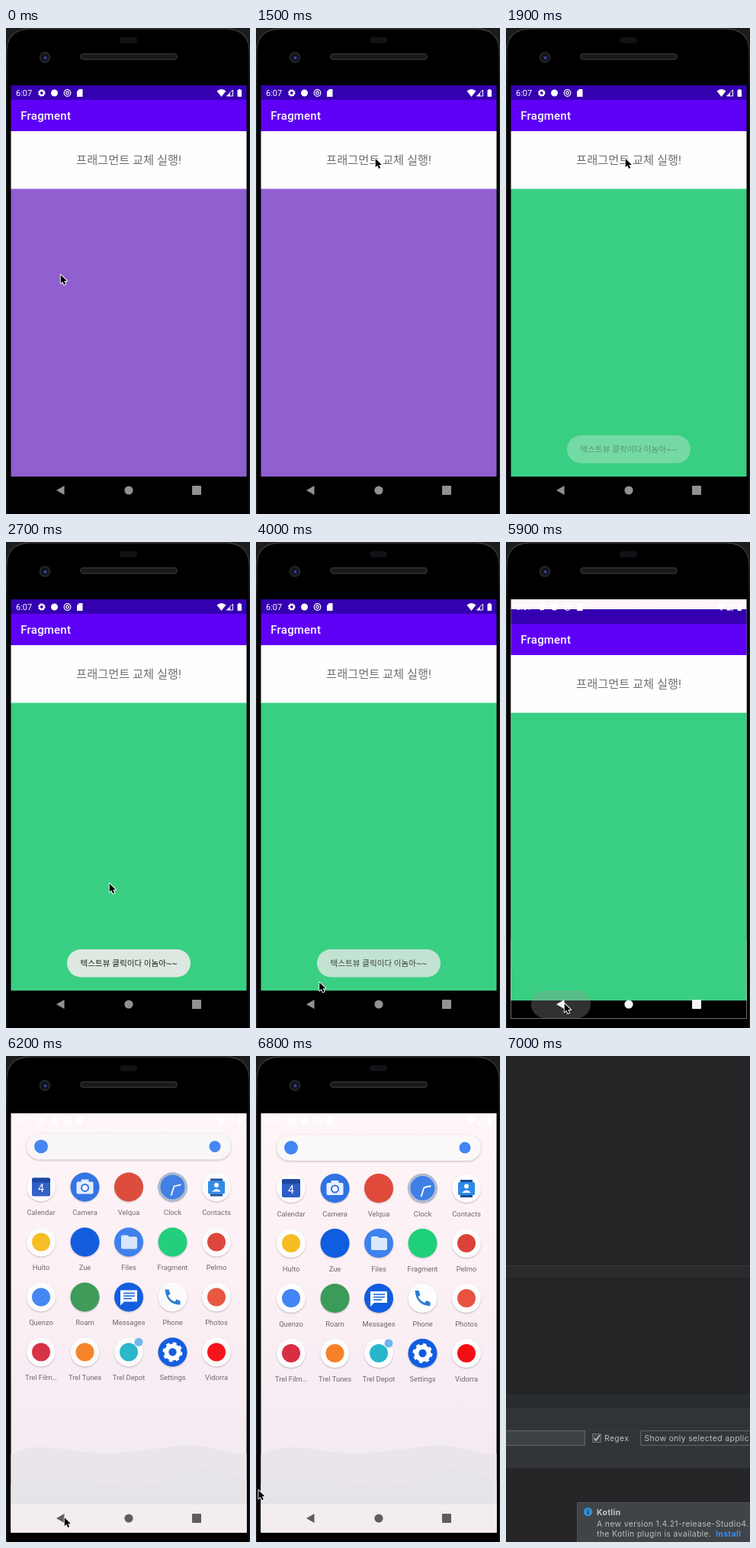
These frames come from a looping animation (320 px wide and 636 px high, 7.8 s). An HTML page with a canvas:

```html
<!DOCTYPE html>
<html lang="ko">
<head>
<meta charset="utf-8">
<style>
html, body { margin: 0; width: 100%; height: 100%; overflow: hidden; background: #000; }
canvas { display: block; width: 320px; height: 636px; }
</style>
</head>
<body>
<canvas id="stage" width="320" height="636"></canvas>
<script>
const g = document.getElementById('stage').getContext('2d');
const LOOP = 7800, STEP = 100;
const SWAP = 1800, PRESS = 5800, CLOSE = 5888, EDITOR = 7000;
const UI = 'Roboto, "Noto Sans CJK KR", "Noto Sans CJK JP", sans-serif';
const IDE = 'Inter, sans-serif';

// Pointer tip: time, x, y
const POINTER = [
  [0, 71, 322], [100, 116, 283], [200, 116, 283], [400, 188, 195], [500, 188, 195],
  [1300, 154, 174], [1500, 156, 170], [1900, 156, 170], [2700, 135, 446], [3300, 100, 562],
  [4100, 80, 577], [4900, 78, 581], [5200, 59, 600], [5400, 83, 606], [5600, 76, 603],
  [6300, 76, 603], [6900, -12, 560], [LOOP, -12, 560]
];

const clamp = v => Math.max(0, Math.min(1, v));
const ramp = (t, from, to) => clamp((t - from) / (to - from));
const decelerate = p => 1 - (1 - p) ** 3.4;

function rect(color, x, y, w, h, r = 0) {
  g.fillStyle = color;
  g.beginPath();
  g.roundRect(x, y, w, h, r);
  g.fill();
}
function disc(color, x, y, r) {
  g.fillStyle = color;
  g.beginPath();
  g.arc(x, y, r, 0, 7);
  g.fill();
}
function ring(color, x, y, r, width, dash = []) {
  g.strokeStyle = color;
  g.lineWidth = width;
  g.setLineDash(dash);
  g.beginPath();
  g.arc(x, y, r, 0, Math.PI * 2);
  g.stroke();
  g.setLineDash([]);
}
function path(d, fill, stroke, width = 1) {
  const p = new Path2D(d);
  if (stroke) { g.strokeStyle = stroke; g.lineWidth = width; g.stroke(p); }
  if (fill) { g.fillStyle = fill; g.fill(p); }
}
function text(s, x, y, font, color, align = 'left', spacing = 0) {
  g.font = font;
  g.fillStyle = color;
  g.textAlign = align;
  g.letterSpacing = spacing + 'px';
  g.fillText(s, x, y);
}
function gradient(x0, y0, x1, y1, ...colors) {
  const f = g.createLinearGradient(x0, y0, x1, y1);
  colors.forEach((c, i) => f.addColorStop(i / (colors.length - 1), c));
  return f;
}
function gear(color, x, y, r) {
  ring(color, x, y, r * .62, r * .45);
  const tooth = r * .85 * Math.PI / 8;
  ring(color, x, y, r * .85, r * .3, [tooth, tooth]);
}
function group(alpha, x, y, draw) {
  g.save();
  g.globalAlpha *= alpha;
  g.translate(x, y);
  draw();
  g.restore();
}

function phone() {
  rect('#1c1c1d', 0, 0, 320, 636);
  path('M1.5 636V30Q2 2 32 1.500H288Q318 2 318.500 30V636Z', '#000',
    gradient(0, 0, 0, 75, '#636466', '#3a3a3c', '#1b1b1c'), 1.6);
  rect('#111116', 149, 12, 23, 8, 4);
  rect('#29292b', 97, 33, 128, 9, 4.5);
  rect('#19191b', 99, 35, 124, 5, 2.5);
  disc('#222224', 51, 38.5, 7.5);
  disc('#11121f', 51, 38.5, 5);
  disc('#36449a', 51.5, 39, 2);
}

// Icons are drawn around the centre of a 38 px disc.
const BLUE = '#0f5de0', WHITE = '#fdfdfd';
const dot = color => () => disc(color, 0, 0, 12);
const APPS = [
  ['Calendar', WHITE, () => {
    rect('#2d5ec5', -12, -12, 24, 24, 2);
    rect('#1d47a3', -12, -12, 24, 6, 2);
    text('4', 0, 7, '14px ' + UI, '#fff', 'center');
  }],
  ['Camera', '#2f73e4', () => {
    rect('#e8effc', -11, -7, 22, 16, 2);
    rect('#e8effc', -5, -10, 10, 5, 1);
    disc('#2f73e4', 0, 1, 5.5);
    disc('#fff', 0, 1, 3.5);
  }],
  ['Velqua', '#df4a3b'],
  ['Clock', '#3f7fe6', () => {
    ring('#b3bdcb', 0, 0, 17.5, 3);
    path('M-2 11 L2 -1 L11 -3', null, '#fff', 1.8);
  }],
  ['Contacts', WHITE, () => {
    rect('#2b8ae6', -11, -8, 22, 17, 2);
    rect('#164f9f', -8, -11, 16, 3);
    rect('#164f9f', -8, 9, 16, 3);
    disc('#fff', 0, -2.5, 3);
    path('M-6 6 Q0 -1 6 6Z', '#fff');
  }],
  ['Hulto', WHITE, dot('#f5bd22')],
  ['Zue', BLUE],
  ['Files', '#3d82ee', () => {
    rect('#dce9fc', -10, -9, 10, 8, 2);
    rect('#dce9fc', -10, -7, 21, 16, 2);
  }],
  ['Fragment', '#1fd07a'],
  ['Pelmo', WHITE, dot('#dc4338')],
  ['Quenzo', WHITE, dot('#4285f4')],
  ['Roam', '#3b9b58'],
  ['Messages', BLUE, () => {
    path('M-11 -9H11V6H-6L-11 11Z', '#fff');
    path('M-7 -5H8M-7 -1.5H8M-7 2H4', null, BLUE, 1.6);
  }],
  ['Phone', WHITE, () => path('M-10 -10 L-5 -10 L-3 -4 L-6 -2 Q-3 4 3 6 L5 3 L10 5 L10 10 Q-8 10 -10 -10Z', '#287bd2')],
  ['Photos', WHITE, dot('#e8533f')],
  ['Trel Film…', WHITE, dot('#d92e42')],
  ['Trel Tunes', WHITE, dot('#f58226')],
  ['Trel Depot', WHITE, () => {
    disc('#27b6c9', 0, 0, 12);
    disc('#6cb7ed', 13, -13, 5.5);
  }],
  ['Settings', BLUE, () => gear('#fff', 0, 0, 13)],
  ['Vidorra', WHITE, dot('#f40f14')]
];

function shadow(blur, draw) {
  g.shadowColor = 'rgba(60,40,60,.3)';
  g.shadowBlur = blur;
  g.shadowOffsetY = 1;
  draw();
  g.shadowColor = 'transparent';
}
function wallpaper() {
  rect(gradient(0, 75, 0, 520, '#fff6f7', '#fbf0f5', '#f4eaf2'), 6, 75, 310, 549);
  path('M6 522 Q25 512 42 512 T85 516 T130 520 T180 516 T230 510 T280 516 T316 520V624H6Z', '#e9e5eb');
  path('M6 560 Q60 545 120 558 T220 550 T316 557V624H6Z', '#e7e4e9');
  rect('rgba(250,243,245,.65)', 6, 587, 310, 37);
}
function launcher() {
  shadow(3, () => rect('#faf8f9', 27, 103, 268, 34, 17));
  disc('#4285f4', 46, 120, 9);
  disc('#4285f4', 274, 120, 7.5);
  APPS.forEach(([label, plate, glyph], i) => {
    const x = 46 + i % 5 * 57.5, y = 173 + Math.floor(i / 5) * 72;
    shadow(2, () => disc(plate, x, y, 19));
    if (glyph) group(1, x, y, glyph);
    text(label, x, y + 36.5, '9.4px ' + UI, '#6e676b', 'center');
  });
}

function app(t) {
  rect('#3500b0', 6, 75, 310, 19);
  rect('#5f00f6', 6, 94, 310, 41);
  text('Fragment', 19.3, 120, '500 15px ' + UI, '#fff', 'left', .2);
  rect('#fffeff', 6, 135, 310, 76);
  text('프래그먼트 교체 실행!', 161, 178, '15.25px ' + UI, '#6f6f6f', 'center');
  rect(t < SWAP ? '#905fd0' : '#39cf82', 6, 210.5, 310, 376.5);
  rect('#000', 6, 587, 310, 37);
}

function toast(t) {
  const fadeIn = 1 - (1 - ramp(t, SWAP, SWAP + 500)) ** 2;
  const fadeOut = 1 - ramp(t, SWAP + 2000, SWAP + 2500) ** 2;
  group(fadeIn * fadeOut, 0, 0, () => {
    rect('#dde8e1', 80, 533, 162, 36.5, 18.25);
    text('텍스트뷰 클릭이다 이놈아~~', 161, 555, '10.6px ' + UI, '#222', 'center');
  });
}

function statusBar() {
  text('6:07', 13, 89, '11px ' + UI, '#fff');
  gear('#fff', 46.8, 85, 4.8);
  disc('#fff', 63.5, 85, 4.5);
  ring('#fff', 80.5, 85, 4.3, 1.2);
  ring('#fff', 80.5, 85, 1.8, 1.2);
  path('M96 80H100.500V90H93V83Z', '#fff');
  path('M276.5 82.5Q282.5 77.5 288.5 82.5L282.5 90Z', '#fff');
  path('M297.5 81V89H289.500Z', null, '#fff', 1);
  path('M294 85V89H290Z', '#fff');
  rect('#fff', 303.5, 81, 5.5, 9, 1);
  rect('#fff', 305, 80, 2.5, 2);
}

function navBar(t) {
  const press = t < PRESS ? 0 : 1 - ramp(t, 5900, 6200);
  rect(`rgba(150,150,150,${press * .33})`, 33, 587, 78, 36, 18);
  const color = t < PRESS ? '#919191' : t < 6100 ? '#f4f4f4' : '#5f5b5e';
  path('M66 605L76.5 599V611Z', color);
  disc(color, 161, 605, 5.6);
  rect(color, 244, 599, 12, 12, 1);
}

function pointer(t) {
  const i = POINTER.findIndex(k => k[0] > t);
  const [t0, x0, y0] = POINTER[i - 1], [t1, x1, y1] = POINTER[i];
  const p = ramp(t, t0, t1);
  group(1, x0 + (x1 - x0) * p, y0 + (y1 - y0) * p, () => {
    g.lineJoin = 'round';
    path('M.7 1V12.2L3.2 9.8L5.2 14L7.2 13.1L5.3 9H8.9Z', '#000', '#fff', 1.8);
  });
}

// The closing app drops and fades; the home screen content settles from above.
function emulator(t) {
  phone();
  g.save();
  g.beginPath();
  g.rect(6.5, 75, 309, 548.5);
  g.clip();
  const since = t - CLOSE;
  if (since > 0) {
    wallpaper();
    const settle = decelerate(ramp(since, 100, 450));
    group(ramp(since, 100, 317), 0, 37 * (settle - 1), launcher);
  }
  const drop = Math.round(86 * decelerate(ramp(since, 0, 250)));
  group(1 - ramp(since, 25, 150), 0, drop, () => app(t));
  toast(t);
  statusBar();
  navBar(t);
  g.restore();
  pointer(t);
}

function editor() {
  const say = (s, x, y, color = '#bcbec0', weight = 400) =>
    text(s, x, y, `${weight} 10.4px ${IDE}`, color, 'left', .37);
  const box = (fill, line, x, y, w, h, r = 0) => {
    rect(line, x, y, w, h, r);
    rect(fill, x + 1, y + 1, w - 2, h - 2, r);
  };
  rect('#252426', 0, 0, 320, 636);
  rect('#2b2a2c', 0, 274, 320, 16);
  rect('#343335', 0, 274, 320, 1);
  rect('#2a2d2f', 0, 443, 320, 18);
  rect('#323538', 0, 461, 320, 78);
  rect('#2a2c2e', 0, 483, 320, 1);
  box('#3d4244', '#62676a', -5, 490, 109, 20);
  box('#43494b', '#6b6f71', 113, 494, 12, 12, 1);
  path('M115.5 500L118 503L123 496', null, '#c4c6c8', 1.4);
  say('Regex', 129, 504);
  box('#34383a', '#606568', 176, 490, 160, 20, 2);
  say('Show only selected applic', 181.5, 504);
  box('#404446', '#505457', 93, 584, 240, 70);
  disc('#2f8fd6', 107.5, 596.5, 5.7);
  rect('#25323c', 106.8, 595.5, 1.5, 4.5);
  rect('#25323c', 106.8, 592.8, 1.5, 1.6);
  say('Kotlin', 119, 600.5, '#c4c6c8', 700);
  say('A new version 1.4.21-release-Studio4.', 119, 615.5);
  say('the Kotlin plugin is available.', 119, 629);
  say('Install', 275, 629, '#3f8fea', 700);
}

function frame(now) {
  const t = Math.floor(now % LOOP / STEP) * STEP;
  if (t < EDITOR) emulator(t);
  else editor();
  requestAnimationFrame(frame);
}
requestAnimationFrame(() => frame(performance.now()));
</script>
</body>
</html>
```
